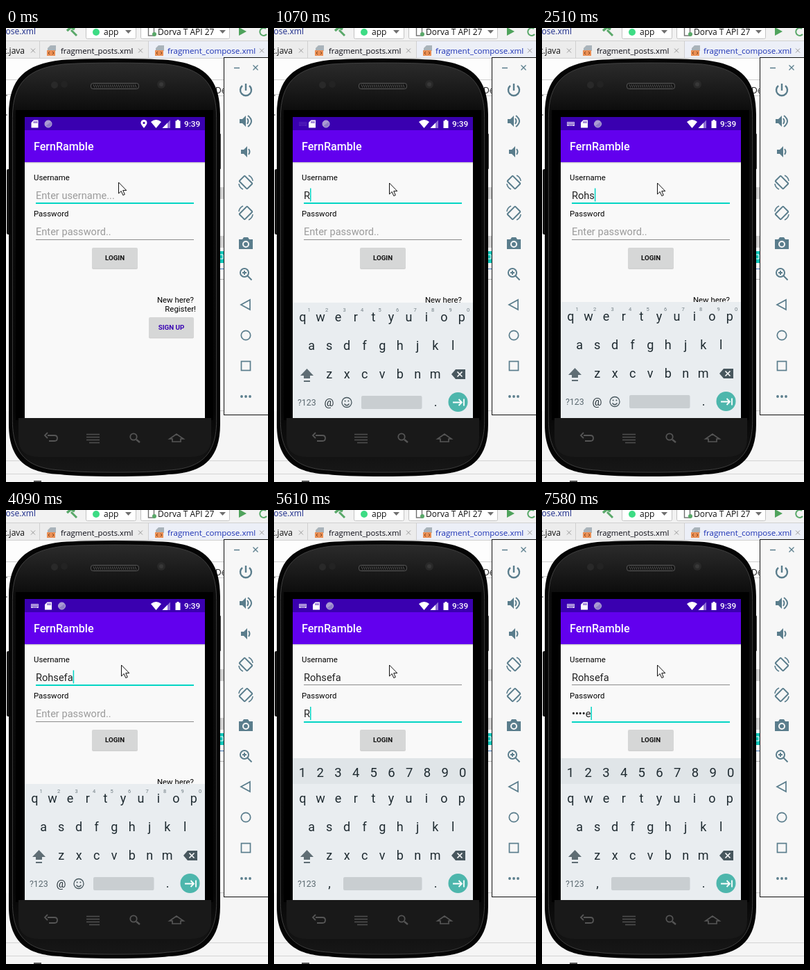
An HTML page for the animation above (8 s loop, 378x653 px).

```html
<!DOCTYPE html>
<html lang="en">
<head>
<meta charset="utf-8">
<title>Login screen in an emulator</title>
<style>
html, body { margin: 0; width: 100%; height: 100%; overflow: hidden; background: #fff; }
svg { display: block; width: 100vw; height: 100vh; }
text { font-family: Roboto, sans-serif; white-space: pre; }
.ide text { font-family: "Open Sans", "Noto Sans", sans-serif; }
</style>
</head>
<body>
<svg id="stage" viewBox="0 0 378 653"></svg>
<script>
const LOOP = 8000;
const USER = 'Rohsefa';
const TEAL = '#03d5c4';
const BG = '#f9f9f9';
const stage = document.getElementById('stage');

const rect = (x, y, w, h, fill, more = '') =>
  `<rect x="${x}" y="${y}" width="${w}" height="${h}" fill="${fill}" ${more}/>`;
const circle = (x, y, r, fill, more = '') =>
  `<circle cx="${x}" cy="${y}" r="${r}" fill="${fill}" ${more}/>`;
const path = (d, fill, more = '') => `<path d="${d}" fill="${fill}" ${more}/>`;
const line = (d, color, w = 1, more = '') =>
  path(d, 'none', `stroke="${color}" stroke-width="${w}" ${more}`);
const text = (x, y, s, size, fill, more = '') =>
  `<text x="${x}" y="${y}" font-size="${size}" fill="${fill}" ${more}>${s}</text>`;
const group = (s, more = '') => `<g ${more}>${s}</g>`;
const MID = 'text-anchor="middle"';
const END = 'text-anchor="end"';
const BOLD = 'font-weight="500"';

function ide() {
  const cross = x => line(`M${x - 3} 29.5l6 6m0-6l-6 6`, '#9a9a9a');
  const arrow = x => path(`M${x} 3h9l-4.5 5z`, '#6e6e6e');
  const fileIcon = x =>
    path(`M${x + 5} 25h8v8h-12v-4z`, '#a9b3ba') +
    rect(x, 32, 12, 8, '#ea8f55') +
    line(`M${x + 4} 34l-2 2 2 2m4-4l2 2-2 2`, '#6b3510', 0.9);
  const combo = (x, w) => rect(x + 0.5, -8, w, 23.5, '#fff', 'rx="2" stroke="#c3c3c3"');
  return group(
    rect(0, 0, 378, 653, '#fdfdfd') +
    rect(0, 0, 378, 18, '#f2f2f2') +
    rect(0, 18, 378, 26, '#ececec') +
    rect(206, 19, 172, 24, '#eceff7') +
    line('M0 18.5H378M0 43.5H378M48.5 19V43M205.5 19V43', '#d0d0d0') +
    text(43, 9, 'pose.xml', 12, '#1a2a8a', END) +
    line('M94 3l8 8', '#59a869', 3) + line('M88 4l6-5 5 3', '#59a869', 3.5) +
    combo(115, 72) + circle(130, 6, 5, '#3ddc84') + text(141, 10, 'app', 12, '#111') + arrow(172) +
    combo(194, 128) + rect(205.5, -3, 8, 14, '#fff', 'stroke="#6e6e6e" stroke-width="1.4"') +
    circle(214, 9, 3, '#59a869') +
    text(219, 9.5, 'Dorva T API 27', 12, '#111') + arrow(308) +
    path('M336 -1l11 6-11 6z', '#4fa35c') +
    line('M376 9a5.5 5.5 0 1 1 -1-8', '#59a869', 2) +
    text(27, 37, 't.java', 12, '#111', END) + cross(39) +
    fileIcon(59) + text(79, 37, 'fragment_posts.xml', 11.3, '#0a0a14') + cross(194) +
    fileIcon(215) + text(233, 37, 'fragment_compose.xml', 11.6, '#1a30b4') + cross(369) +
    line('M0 74.5H20M0 95.5H8M290 74.5H314M300 97.5H314', '#d0d0d0') +
    line('M0 97h2M0 125h2', '#444') +
    text(302, 94, 'De', 12, '#222') +
    rect(306, 229, 8, 17, '#d0d0d0') + rect(306, 299, 8, 17, '#d0d0d0') +
    rect(306, 321, 8, 17, '#10c5b8') + line('M309 326h4v6h-4', '#fff') +
    line('M306 346.5H314', '#3f78b8') + line('M306 361.5H314', '#b5b5b5') +
    rect(0, 551, 378, 102, '#f5f5f5') + line('M300 550.5H314', '#ccc') +
    line('M0 622.5H378M0 641.5H378', '#d4d4d4') +
    rect(40, 651, 11, 2, '#555'), 'class="ide"');
}

function phone() {
  const body = 'M4 125C4 72 28 52 80 46Q110 44 157 44T234 46C286 52 309 72 309 125V570' +
    'C309 628 275 640 235 642Q213 645 157 645T78 642C38 640 4 628 4 570Z';
  let grill = '';
  for (let x = 126; x < 189; x += 3) grill += `M${x} 81l2 5`;
  return `<defs><linearGradient id="face" x2="0" y2="1">
    <stop offset="0" stop-color="#2b2b2b"/><stop offset=".12" stop-color="#0c0c0c"/>
    <stop offset=".85" stop-color="#060606"/><stop offset="1" stop-color="#171717"/></linearGradient></defs>` +
    rect(1, 203, 6, 94, '#151515', 'rx="2"') +
    rect(306, 152, 4, 51, '#444', 'rx="1"') +
    path(body, '#050505') +
    path(body, 'url(#face)', 'stroke="#404040" transform="translate(5.500 7) scale(.965 .98)"') +
    rect(14, 118, 285, 446, '#000') +
    circle(70, 82, 5, '#292929') + circle(84, 81, 5, '#232323') +
    circle(224, 81, 6, '#292929') + circle(224, 81, 3, '#383838') +
    rect(122.5, 79.5, 69, 8, '#171717', 'rx="3" stroke="#5a5a5a"') + line(grill, '#4e4e4e') +
    path('M18 561H296V590Q296 617 266 617H48Q18 617 18 590Z', '#191919') +
    group(
      line('M60 586H70Q74 586 74 590T70 594H62M60 582l-4 4 4 4', '#555', 1.8) +
      line('M116 584.5h19M116 588.5h19M116 592.5h19M120 596.5h15', '#505050', 1.6) +
      circle(184, 588, 4.7, 'none', 'stroke="#555" stroke-width="1.8"') + line('M188 592l5 4', '#555', 2.4) +
      line('M236 591l10-7 10 7h-4v4h-12v-4z', '#555', 1.7));
}

function panel() {
  const c = '#5a7d8c';
  const at = (y, s) => group(s, `transform="translate(346 ${y})"`);
  const speaker = dx => path(`M${dx} -3h4l5-5v16l-5-5h-4z`, c);
  const rotate = rect(-5.5, -8, 11, 16, 'none', `rx="1" transform="rotate(-45)" stroke="${c}" stroke-width="2"`) +
    line('M-10 2A10 10 0 0 0 -4 10M10 -2A10 10 0 0 0 4 -10', c, 1.6);
  return rect(314.5, 42.5, 70, 514, '#f7f7f7', 'stroke="#111"') +
    line('M329 57.5h8M356.500 53.500l7 7m0-7l-7 7', c, 1.3) +
    at(90, line('M0 -10V0M-5 -7A8 8 0 1 0 5 -7', c, 2.4)) +
    at(134, speaker(-9) + line('M2 -4Q5 0 2 4M3 -8Q13 0 3 8', c, 2)) +
    at(178, speaker(-7) + line('M4 -4Q7 0 4 4', c, 2)) +
    at(222, rotate) +
    at(266, group(rotate, 'transform="scale(-1 1)"')) +
    at(310, path('M-10 -6h5l2-3h6l2 3h5v14h-20z', c) +
      circle(0, 1, 4, c, 'stroke="#f7f7f7" stroke-width="2"')) +
    at(354, circle(-2, -2, 6, 'none', `stroke="${c}" stroke-width="2"`) +
      line('M2.500 2.500l6 6M-5 -2h6M-2 -5v6', c, 1.9)) +
    at(398, line('M-7 0L6 -7V7Z', c, 1.7)) +
    at(442, circle(0, 0, 6.7, 'none', `stroke="${c}" stroke-width="1.7"`)) +
    at(486, rect(-6.5, -6.5, 13, 13, 'none', `stroke="${c}" stroke-width="1.7"`)) +
    at(530, [-6, 0, 6].map(x => circle(x, 0, 1.9, c)).join(''));
}

function statusBar() {
  return rect(27, 128, 260, 19.5, '#3a00b0') +
    group(rect(-5.5, -3, 11, 6, '#c9bce8') +
      line('M-4.500 -1.500h9M-4.500 .500h9M-2.500 2h5', '#3a00b0', 1, 'stroke-dasharray="1 1"'),
      'id="kbIcon"') +
    group(path('M-1.500 -5.500h6.500v11h-10v-7.500z', '#fff') +
      line('M-1 -4v3M1 -4v3M3 -4v3', '#3a00b0', 0.9), 'id="sdIcon"') +
    group(circle(0, 0, 5, '#8e7dc6', 'stroke="#b9add9"') + path('M0 -5A5 5 0 0 0 -4 3L4 -3A5 5 0 0 0 0 -5Z', '#a99bd2'),
      'id="dotIcon"') +
    group(path('M199 144Q194.500 138.500 194.500 136.500A4.500 4.500 0 0 1 203.500 136.500Q203.500 138.500 199 144Z', '#fff') +
      circle(199, 136.5, 1.6, '#3a00b0'), 'id="pin"') +
    path('M209 135Q216.500 129 224 135L216.500 144Z', '#fff') +
    path('M237 132.500V144H225.500Z', '#8f70d4') + path('M233 136.500V144H225.500Z', '#fff') +
    path('M244.500 133.500h2v-1.500h3v1.500h2v10.500h-7z', '#fff') +
    text(257, 142, '9:39', 11.8, '#fff', BOLD);
}

function button(x, y, w, h, label, color) {
  return rect(x, y + 1.5, w, h, '#000', 'rx="2" opacity=".16"') +
    rect(x, y, w, h, '#d6d7d7', 'rx="2"') +
    text(x + w / 2, y + h / 2 + 3.5, label, 9.75, color, MID + ' font-weight="600"');
}

function field(id, y, label) {
  return text(40, y - 27, label, 11.4, '#000') +
    text(43, y, '', 14.6, '#222', `id="${id}Text"`) +
    rect(43, Math.floor(y + 6), 228, 1, '#888', `id="${id}Line"`);
}

function app() {
  return rect(27, 147.5, 260, 413.5, BG) + statusBar() +
    rect(27, 193, 260, 1, '#cfcfcf') + rect(27, 194, 260, 1, '#e8e8e8') +
    rect(27, 147, 260, 46, '#6200ee') +
    text(40, 176, 'FernRamble', 16.1, '#fff', BOLD) +
    field('user', 245.5, 'Username') + field('pass', 298, 'Password') +
    rect(0, 0, 1.5, 19, TEAL, 'id="caret"') +
    button(124, 316, 66, 29.5, 'LOGIN', '#111') +
    text(271, 395, 'New here?', 11.4, '#000', END) +
    text(274, 408, 'Register!', 11.4, '#000', END) +
    button(206, 416, 65, 29, 'SIGN UP', '#3700b3');
}

function keyboard() {
  const ink = '#1f2b31';
  const soft = '#48575e';
  const row = (s, x, y, size = 18, color = ink, step = 25.5) =>
    [...s].map((k, i) => text(x + i * step, y, k, size, color, MID)).join('');
  const shared = rect(27, 394, 260, 167, '#e9edf0') +
    row('qwertyuiop', 41.4, 420.5) + row('asdfghjkl', 54.2, 461.5) + row('zxcvbnm', 79.7, 503) +
    path('M47.500 489L57 499H52V503H43V499H38Z', '#5f6d74') + rect(43, 506, 9, 2, '#5f6d74') +
    path('M256 497l6-7h14v14h-14z', soft) + line('M264.500 493.500l7 7m0-7l-7 7', '#fff', 1.6) +
    text(34, 542, '?123', 12.4, '#5a686f') + text(233, 543, '.', 18, ink, MID) +
    circle(265.5, 537, 14, '#4db6ac') + line('M258 537.500H271M266.500 533l4.500 4.500-4.500 4.500M274 532.500v10', '#fff', 1.8);
  const space = x => rect(x, 528, 213.5 - x, 19, '#c9ced1', 'rx="2"');
  const plain = row('1234567890', 50.5, 407, 7.5, '#6f7c82') +
    text(79.5, 543, '@', 15.5, ink, MID) + space(126) +
    circle(105, 537.5, 7, 'none', `stroke="${soft}" stroke-width="1.3"`) +
    circle(102.6, 535.5, 1, soft) + circle(107.4, 535.5, 1, soft) +
    line('M101.500 539.500Q105 544 108.500 539.500', soft, 1.3);
  const secret = rect(27, 357, 260, 37, '#e0e5e8') +
    row('1234567890', 41, 383.5, 18.5, ink, 25.7) +
    text(80, 542.5, ',', 18, ink, MID) + space(100);
  return group(shared + group(plain, 'id="plainKeys"') + group(secret, 'id="secretKeys"'), 'id="keys"');
}

stage.innerHTML = ide() + phone() +
  `<clipPath id="screen">${rect(27, 128, 260, 433, '#000')}</clipPath>` +
  group(app() + keyboard(), 'clip-path="url(#screen)"') + panel() +
  path('M0 0V16L3.700 12.500L6.300 18.500L8.800 17.400L6.200 11.600H11.300Z', '#fff', 'id="mouse" stroke="#111" stroke-width="1"');

const $ = id => document.getElementById(id);
const show = (id, on) => $(id).setAttribute('opacity', +on);
const move = (id, x, y) => $(id).setAttribute('transform', `translate(${x} ${y})`);
const count = (t, times) => times.filter(at => t >= at).length;
const between = (t, a, b) => t >= a && t < b;

const USER_KEYS = [920, 1580, 2110, 2510, 3070, 3500, 4090];
const PASS_KEYS = [5610, 6320, 6720, 7150, 7580];
const CARET_OFF = [[0, 240], [1460, 1580], [5080, 5610], [6170, 6320]];

function setField(id, value, hint, focused, y) {
  const el = $(id + 'Text');
  el.textContent = value || hint;
  el.setAttribute('fill', value ? '#222' : '#9b9b9b');
  const rule = $(id + 'Line');
  rule.setAttribute('height', focused ? 2 : 1);
  rule.setAttribute('fill', focused ? TEAL : '#8c8c8c');
  if (focused) {
    $('caret').setAttribute('x', value ? 43 + el.getComputedTextLength() : 43.2);
    $('caret').setAttribute('y', y - 15);
  }
}

function draw(t) {
  const onPass = t >= 4660;
  const n = count(t, PASS_KEYS);
  setField('user', USER.slice(0, count(t, USER_KEYS)), 'Enter username...', !onPass, 245.5);
  setField('pass', n ? '•'.repeat(n - 1) + USER[n - 1] : '', 'Enter password..', onPass, 298);
  show('caret', !CARET_OFF.some(([a, b]) => between(t, a, b)));

  const opening = between(t, 1070, 1190);
  const open = t >= 1190;
  show('keys', open || opening);
  move('keys', 0, opening ? 1 : 0);
  show('plainKeys', !onPass);
  show('secretKeys', onPass);

  show('kbIcon', open ? 1 : opening ? 0.15 : 0);
  move('kbIcon', 41.5, 138);
  move('sdIcon', open ? 61 : opening ? 55 : 41.5, 138);
  move('dotIcon', open ? 80.5 : opening ? 75 : 61, 138);
  show('pin', t < 360);

  const step = Math.min(2, count(t, [120, 240]));
  move('mouse', 162.5 + step * 2, 222 + step * 0.5);
}

function tick(now) {
  draw(now % LOOP);
  requestAnimationFrame(tick);
}
draw(0);
requestAnimationFrame(tick);
</script>
</body>
</html>
```
